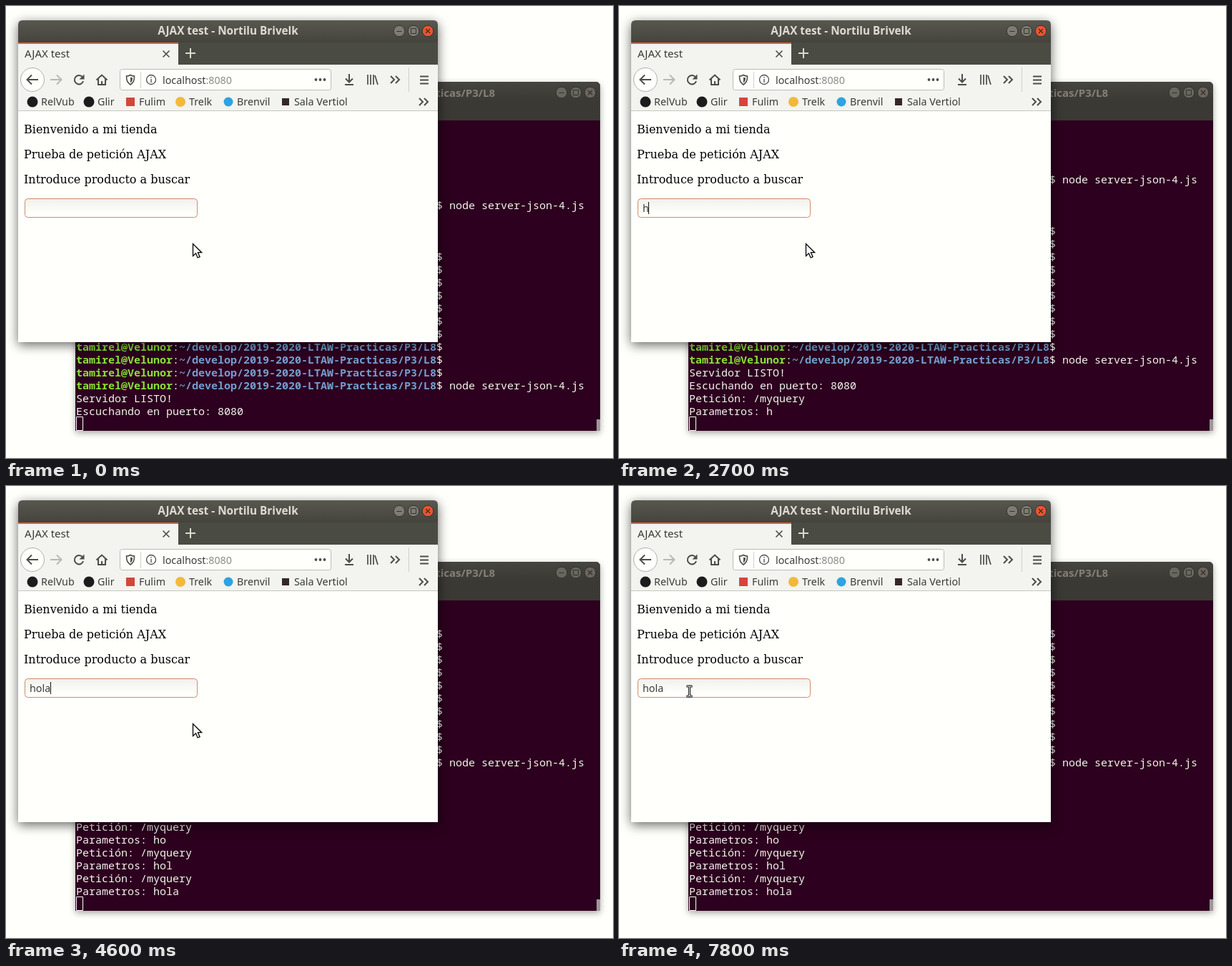
Animation, 849 px wide and 632 px high, one loop 8000 ms. Source, as an HTML page:

```html
<!DOCTYPE html>
<html lang="es">
<head>
<meta charset="utf-8">
<title>AJAX test</title>
<style>
  html, body { margin: 0; width: 100%; height: 100%; overflow: hidden; background: #fffffb; }
  .window, svg, pre, .bar { position: absolute; }
  .window { border-radius: 6px 6px 0 0; overflow: hidden; }
  #terminal { left: 97px; top: 106px; width: 734px; height: 488px; background: #2c001e;
    box-shadow: 0 3px 10px rgba(0, 0, 0, .35); }
  #browser { left: 17px; top: 20px; width: 587px; height: 450px; background: #fffffb;
    box-shadow: 0 4px 16px rgba(0, 0, 0, .6); }
  pre { left: 1px; bottom: 19px; margin: 0; color: #f4f4ee; font: 15px/18px "Noto Sans Mono", monospace; }
  pre b { color: #8ae234; }
  pre i { color: #729fcf; font-style: normal; font-weight: bold; }
  .bar { left: 0; top: 0; width: 100%; height: 54px; background: linear-gradient(#45443f, #3a3934 28px); }
  .bar span { position: absolute; right: 147px; top: 5px; color: #858178;
    font: bold 15px/20px "Noto Sans", sans-serif; }
  svg { left: 0; top: 0; }
  text { font: 14.3px "Noto Sans", sans-serif; fill: #3a3a38; white-space: pre; }
  .page text { font: 16px "DejaVu Serif", serif; fill: #000; }
  .line { fill: none; stroke: #4c4c4a; stroke-width: 2; }
  .thin { stroke-width: 1.3; }
</style>
</head>
<body>
<div id="terminal" class="window">
  <pre id="log"></pre>
  <div class="bar"><span>2019-2020-LTAW-Practicas/P3/L8</span></div>
</div>
<div id="browser" class="window"></div>

<svg width="849" height="632">
  <defs>
    <linearGradient id="titleFill" x2="0" y2="1">
      <stop stop-color="#59584f"/><stop offset="1" stop-color="#44433d"/>
    </linearGradient>
    <linearGradient id="inputFill" x2="0" y2="1">
      <stop stop-color="#f0f0ec"/><stop offset=".8" stop-color="#fffffb"/>
    </linearGradient>
    <g id="controls" stroke="#33322d">
      <circle r="7.8"/><circle cx="20" r="7.8"/>
      <path d="M-3.5 .5h7M16.5-3.5h7v7h-7z" fill="none"/>
    </g>
    <path id="cross" d="M-3-3 3 3M3-3-3 3" fill="none" stroke="#3c2a24" stroke-width="1.2"/>
    <path id="chevrons" class="line" d="M-6-5-1 0-6 5M1-5 6 0 1 5"/>
  </defs>

  <!-- window buttons of the terminal, its text cursor and scrollbar -->
  <use href="#controls" x="777" y="121" fill="#67665f"/>
  <circle cx="817" cy="121" r="7.8" fill="#67665f" stroke="#33322d"/>
  <use href="#cross" x="817" y="121"/>
  <path d="M98.5 574.5h9v19h-9z" fill="none" stroke="#fff"/>
  <path d="M826 578h5v16h-5z" fill="#9d9799"/>

  <!-- title bar and tabs -->
  <path d="M17 51V26q0-6 6-6H598q6 0 6 6V51z" fill="url(#titleFill)"/>
  <path d="M17 51H604V83H17z" fill="#4a4b42"/>
  <text x="310.5" y="40" text-anchor="middle" style="font-weight:bold;font-size:15.3px;fill:#dfdbd2">AJAX test - Nortilu Brivelk</text>
  <use href="#controls" x="550" y="35" fill="#7d7b73"/>
  <circle cx="590" cy="35" r="7.8" fill="#e9552f" stroke="#33322d"/>
  <use href="#cross" x="590" y="35"/>
  <path d="M17 51H241V83H17zM17 82H604V147H17z" fill="#f3f3ef"/>
  <path d="M17 51H241v2H17z" fill="#dd5f3c"/>
  <path d="M17 146.5H604" stroke="#c6c6c1"/>
  <text x="26" y="72" style="font-size:15px">AJAX test</text>
  <path class="line" style="stroke-width:1.6" d="M219.500 62.500l9 9m0-9l-9 9"/>
  <path class="line" style="stroke:#d8d8d2" d="M251 66h14M258 59v14"/>

  <!-- navigation toolbar -->
  <circle cx="37" cy="103" r="16.500" fill="#fffffb" stroke="#b0b0aa"/>
  <path class="line" d="M45 103H30M36 96.500 29.500 103 36 109.500"/>
  <path class="line" style="stroke:#b8b8b4" d="M62 103H77M71 96.500 77.500 103 71 109.500"/>
  <path class="line" d="M107 99.500A6.200 6.200 0 1 0 108 105"/>
  <path d="M109.500 95.500v7h-7z" fill="#4c4c4a"/>
  <path class="line" d="M126.500 103.500 134 96.500 141.500 103.500M129 102v8h10v-8M134 110v-5"/>
  <rect x="159.500" y="88.500" width="295" height="29" rx="3" fill="#fffffb" stroke="#bdbdb7"/>
  <path d="M188.500 92v23M563.500 86v34" stroke="#d0d0cb"/>
  <path class="line" style="stroke-width:1.6" d="M168.500 98q3 0 5.500-1.500 2.500 1.500 5.500 1.500c0 6-1 9-5.500 12-4.500-3-5.500-6-5.500-12z"/>
  <path d="M174 99.500v8q3-2 3-7z" fill="#4c4c4a"/>
  <circle class="line thin" cx="203" cy="103" r="6.500"/>
  <path class="line thin" d="M203 99v1.500M203 102v5"/>
  <text x="219" y="109">localhost<tspan fill="#8b8b87">:8080</tspan></text>
  <path class="line" style="stroke-width:3.800;stroke-linecap:round" d="M433.500 103h.01M439.500 103h.01M445.500 103h.01"/>
  <path class="line" d="M480 95v11M475 101.500l5 5 5-5M474 110h12"/>
  <path class="line" d="M506 96v14M510 96v14M514 96v14M516 97l4 13" style="stroke-width:1.700"/>
  <use href="#chevrons" x="544" y="103"/>
  <path class="line" d="M579 98.500h12M579 103.500h12M579 108.500h12"/>

  <!-- bookmarks -->
  <circle cx="37" cy="134" r="7.500" fill="#1c1c1c"/><text x="49" y="139">RelVub</text>
  <circle cx="116" cy="134" r="7.500" fill="#1c1c1c"/><text x="128" y="139">Glir</text>
  <path d="M168 128h12v12h-12z" fill="#d2473a"/><text x="186" y="139">Fulim</text>
  <circle cx="244" cy="134" r="7" fill="#f1b93c"/><text x="256" y="139">Trelk</text>
  <circle cx="311" cy="134" r="6.500" fill="#2ba4e2"/><text x="323" y="139">Brenvil</text>
  <path d="M386 129h10v10h-10z" fill="#35282a"/><text x="403" y="139">Sala Vertiol</text>
  <use href="#chevrons" x="584" y="134"/>

  <g class="page">
    <text x="25" y="178">Bienvenido a mi tienda</text>
    <text x="25" y="213">Prueba de petición AJAX</text>
    <text x="25" y="248">Introduce producto a buscar</text>
  </g>
  <rect x="26.500" y="269.500" width="241" height="26" rx="4" fill="url(#inputFill)" stroke="#d58a70"/>
  <text id="field" x="33" y="288"></text>
  <path id="caret" d="M0 274h1v17h-1z" fill="#111"/>

  <path id="arrow" d="M0 0v17l4-3.700 2.600 6.200 3-1.300-2.700-6h5.300z" fill="#fff" stroke="#000" stroke-width="1.300"/>
  <g id="beam" fill="none">
    <path d="M-4-7h3l1 1 1-1h3M0-6V6M-4 7h3l1-1 1 1h3" stroke="#000" stroke-width="3"/>
    <path d="M-3.500-7h2.500l1 1 1-1h2.500M0-6V6M-3.500 7h2.500l1-1 1 1h2.500" stroke="#fff" stroke-width="1.100"/>
  </g>
</svg>

<script>
const LOOP = 8000, STEP = 100, WORD = 'hola';
const typedAt = [2000, 3100, 3600, 4500];
const loggedAt = [2300, 3100, 3700, 4600];
const caretOn = [[600, 1800], [2000, 4200], [4500, 6000], [6600, 7800]];
const caretX = [33, 41, 50, 54, 62];
// time, x, y of the mouse
const mousePath = [
  [0, 261.5, 332.5], [4900, 261.5, 332.5], [5000, 245, 445], [5100, 220, 564], [5300, 226, 568],
  [5600, 269, 569], [6100, 244.5, 568], [6200, 253, 574], [6300, 235, 540], [6500, 150, 390],
  [6700, 110, 291], [6900, 95, 288], [7000, 98.5, 287], [LOOP, 98.5, 287]
];

const prompt = '<b>tamirel@Velunor</b>:<i>~/develop/2019-2020-LTAW-Practicas/P3/L8</i>$';
const start = [prompt + ' node server-json-4.js', 'Servidor LISTO!', 'Escuchando en puerto: 8080'];
const history = [...start, '^C', ...Array(10).fill(prompt), ...start];

const [log, field, caret, arrow, beam] =
  ['log', 'field', 'caret', 'arrow', 'beam'].map(id => document.getElementById(id));
const countPassed = (times, t) => times.filter(time => time <= t).length;
const show = (node, visible) => node.setAttribute('visibility', visible ? 'visible' : 'hidden');
let shownRequests = -1;

function mouseAt(t) {
  const next = mousePath.findIndex(point => point[0] > t);
  const [t0, x0, y0] = mousePath[next - 1], [t1, x1, y1] = mousePath[next];
  const k = (t - t0) / (t1 - t0);
  return [x0 + (x1 - x0) * k, y0 + (y1 - y0) * k];
}

function writeLog(requests) {
  if (requests === shownRequests) return;
  shownRequests = requests;
  const lines = [...history];
  for (let n = 1; n <= requests; n++)
    lines.push('Petición: /myquery', 'Parametros: ' + WORD.slice(0, n));
  log.innerHTML = lines.join('\n');
}

function draw(now) {
  const t = Math.floor(now % LOOP / STEP) * STEP;
  const typed = countPassed(typedAt, t);
  field.textContent = WORD.slice(0, typed);
  caret.setAttribute('transform', `translate(${caretX[typed]})`);
  show(caret, caretOn.some(([from, to]) => t >= from && t < to));
  writeLog(countPassed(loggedAt, t));

  const [x, y] = mouseAt(t);
  const overPage = y > 296 && y < 470;
  show(arrow, overPage);
  show(beam, !overPage);
  for (const pointer of [arrow, beam]) pointer.setAttribute('transform', `translate(${x} ${y})`);
  requestAnimationFrame(draw);
}
draw(0);
</script>
</body>
</html>
```
